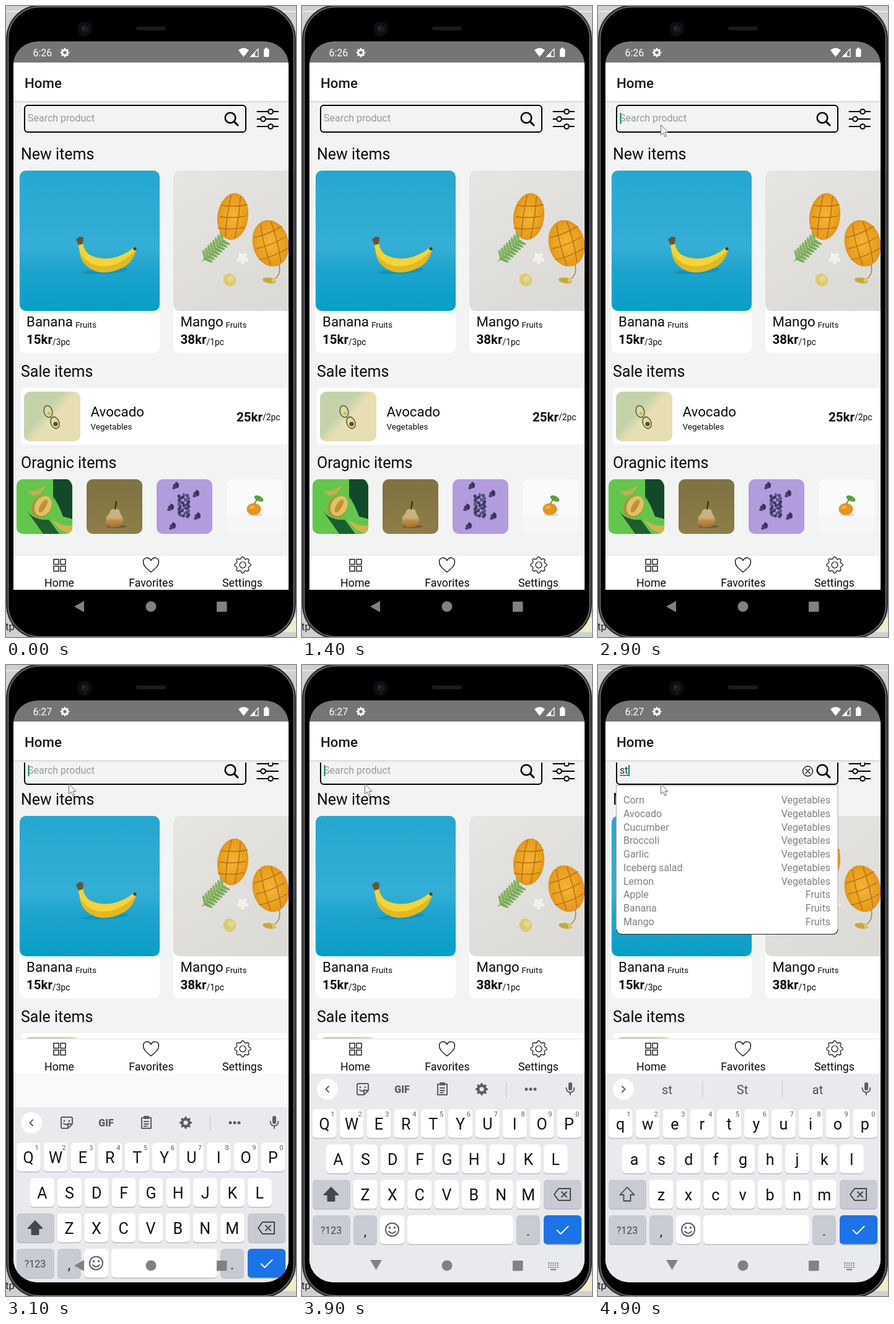
An HTML page that plays this animation: 468 by 1016 pixels, repeating every 5 s.

```html
<!DOCTYPE html>
<html lang="en">
<head>
<meta charset="utf-8">
<title>Grocery search</title>
<style>
html, body { margin: 0; width: 468px; height: 1016px; overflow: hidden; background: #ccc; }
svg { display: block; font-family: Roboto, sans-serif; }
</style>
</head>
<body>
<svg id="stage" width="468" height="1016" viewBox="0 0 468 1016"></svg>
<script>
const LOOP = 5000, STEP = 100;
const stage = document.getElementById('stage');

const repeat = (n, draw) => Array.from({ length: n }, (_, i) => draw(i)).join('');
const rect = (x, y, w, h, fill, r = 0, extra = '') =>
  `<rect x="${x}" y="${y}" width="${w}" height="${h}" rx="${r}" fill="${fill}" ${extra}/>`;
const circle = (x, y, r, fill, extra = '') => `<circle cx="${x}" cy="${y}" r="${r}" fill="${fill}" ${extra}/>`;
const oval = (x, y, rx, ry, turn, fill, extra = '') =>
  `<ellipse rx="${rx}" ry="${ry}" fill="${fill}" transform="translate(${x} ${y}) rotate(${turn})" ${extra}/>`;
const path = (d, fill = 'none', extra = '') => `<path d="${d}" fill="${fill}" ${extra}/>`;
const line = (d, color, width = 1) =>
  path(d, 'none', `stroke="${color}" stroke-width="${width}" stroke-linecap="round" stroke-linejoin="round"`);
const text = (s, x, y, size, fill = '#0b0b0b', extra = '') =>
  `<text x="${x}" y="${y}" font-size="${size}" fill="${fill}" ${extra}>${s}</text>`;
const MID = 'text-anchor="middle"', BOLD = 'font-weight="700"';
const group = (content, y = 0, extra = '') => `<g transform="translate(0 ${y})" ${extra}>${content}</g>`;

function cog(x, y, outer, inner) {
  const points = Array.from({ length: 32 }, (_, i) => {
    const a = (i - 0.5) * Math.PI / 16, r = i % 4 < 2 ? outer : inner;
    return `${(x + r * Math.sin(a)).toFixed(2)} ${(y - r * Math.cos(a)).toFixed(2)}`;
  });
  return `M${points.join('L')}Z`;
}
const solidCog = (x, y, r, fill, hole) => path(cog(x, y, r, r * 0.76), fill) + circle(x, y, r * 0.36, hole);

const defs = `<defs>
  <clipPath id="screen"><rect x="12" y="57" width="444" height="937" rx="40" ry="37"/></clipPath>
  <clipPath id="page"><rect x="12" y="153" width="444" height="787"/></clipPath>
  <clipPath id="melon"><rect x="17" y="762" width="90" height="88" rx="10"/></clipPath>
  <linearGradient id="sky" x2="0" y2="1"><stop stop-color="#25a7cf"/><stop offset=".55" stop-color="#34aed6"/>
    <stop offset=".7" stop-color="#1ea4cd"/><stop offset="1" stop-color="#079fc7"/></linearGradient>
  <linearGradient id="paper" x2=".6" y2="1"><stop stop-color="#e6e5e2"/><stop offset="1" stop-color="#dbdad6"/></linearGradient>
  <linearGradient id="shade" x2="0" y2="1"><stop stop-color="#d5d7d6"/><stop offset="1" stop-color="#f2f4f3"/></linearGradient>
  <linearGradient id="pastel" x2="1" y2=".8"><stop offset=".42" stop-color="#c4d2a9"/><stop offset=".58" stop-color="#e8deb3"/></linearGradient>
  <linearGradient id="olive" x2="0" y2="1"><stop stop-color="#7f7242"/><stop offset="1" stop-color="#8d7d48"/></linearGradient>
  <linearGradient id="pear" x2="0" y2="1"><stop stop-color="#c8b486"/><stop offset=".5" stop-color="#cbb078"/>
    <stop offset=".65" stop-color="#bd8c45"/><stop offset="1" stop-color="#a87332"/></linearGradient>
  <radialGradient id="ripe"><stop stop-color="#f6b535"/><stop offset="1" stop-color="#e69a18"/></radialGradient>
</defs>`;

const phone = rect(0, 0, 468, 1016, '#cfd0d2') + rect(0, 8, 468, 1.5, '#f1f1f1') +
  rect(440, 984, 28, 24, '#f0ecc9') + text('tp', -1, 1005, 17, '#222') +
  rect(0.5, -1.5, 467, 1020, '#29292b', 54, 'stroke="#3b3b3d"') +
  rect(3.5, 1.5, 461, 1014, '#000', 51, 'stroke="#77787a" stroke-width="1.5"') +
  circle(127, 37, 12, '#0e0e10') + circle(127, 37, 6, '#191b22') + circle(125, 36, 2, '#2f3444') +
  rect(210, 33, 48, 6, '#1e1b1a', 3);

const statusBar = clock => rect(12, 57, 444, 34, '#757575') + text(clock, 43.5, 81, 16, '#fff') +
  solidCog(95, 75, 7.5, '#fff', '#757575') +
  path('M375 71Q383.5 64 392 71L383.5 82Z', '#fff') +
  path('M395 81.500L407 69V81.500Z', 'none', 'stroke="#fff" stroke-width="1.300"') +
  path('M394.500 82L402 74.500V82Z', '#fff') +
  rect(416, 69, 8.5, 13, '#fff', 1.5) + rect(418.5, 67, 3.5, 3, '#fff');

const appBar = rect(12, 91, 444, 62.5, '#fff') + rect(12, 153, 444, 4, 'url(#shade)') +
  text('Home', 30, 132, 22.3, '#17171a', 'font-weight="500"');

function searchBox({ typed, caret, underline }) {
  const caretX = typed ? 35.5 + [0, 8, 13.5][typed.length] : 35.5;
  return rect(30, 160, 357, 43, '#f2f4f3', 5, 'stroke="#000" stroke-width="2"') +
    (typed ? text(typed, 35, 186, 16, '#222') : text('Search product', 35, 186, 16, '#999')) +
    (underline ? rect(35, 188, 14, 1.2, '#333') : '') +
    (caret ? rect(caretX, 172, 2, 18, '#0c8574') : '') +
    circle(362, 180, 8.3, 'none', 'stroke="#000" stroke-width="2.6"') + line('M368.500 186.500L374 192', '#000', 3) +
    (typed ? circle(338.5, 182, 8, 'none', 'stroke="#111" stroke-width="1.3"') + line('M335 178.500l7 7m0-7l-7 7', '#111', 1.4) : '') +
    [[170, 427], [182, 415], [194, 427]].map(([y, x]) => line(`M405.500 ${y}H439`, '#000', 2.2) +
      circle(x, y, 3.8, '#f2f4f3', 'stroke="#000" stroke-width="2"')).join('');
}

const product = (x, name, price, unit) => text(name, x, 516, 22.3) +
  text('Fruits', name === 'Banana' ? x + 79 : x + 73, 518, 13.5) +
  text(price, x, 544, 20.5, '#0b0b0b', BOLD) + text(unit, x + 42, 546, 13.8);

const bananaPhoto = rect(22, 265, 226, 226, 'url(#sky)', 10) +
  oval(160, 427, 38, 4, -4, '#0f83ae', 'opacity=".55"') +
  path('M115 376L124 374Q123 391 134 400Q150 409 170 406Q190 402 205 390L210 392Q206 410 190 420Q167 433 145 427Q121 418 119 396Z', '#f5d433') +
  path('M119 396Q128 413 147 418Q178 424 209 394Q205 412 190 420Q167 433 145 427Q121 418 119 396Z', '#e3b91f') +
  path('M113 376L119 371L125 373L124 383L117 385Z', '#6b5330') + circle(208, 391, 2.5, '#4b3a1d');

const mango = (x, y, rx, ry, turn) => `<g transform="translate(${x} ${y}) rotate(${turn})">` +
  oval(0, 0, rx, ry, 0, 'url(#ripe)', 'stroke="#dc9120" stroke-width="1.5"') +
  line(`M${-rx * 0.3} ${-ry * 0.9}Q${-rx * 0.45} 0 ${-rx * 0.3} ${ry * 0.9}M${rx * 0.32} ${-ry * 0.9}Q${rx * 0.45} 0 ${rx * 0.32} ${ry * 0.9}`, '#b9741a', 1.6) +
  [-0.5, 0, 0.5].map(k => line(`M${-rx * 0.85} ${ry * (k + 0.08)}Q0 ${ry * (k + 0.1)} ${rx * 0.85} ${ry * (k - 0.1)}`, '#b9741a', 1.6)).join('') + '</g>';

const mangoPhoto = rect(270, 265, 226, 226, 'url(#paper)', 10) +
  mango(366, 339, 24, 37, 8) + mango(427, 382, 28, 37, -14) +
  line('M317 410Q333 401 353 377', '#7aa956', 1.6) +
  repeat(8, i => {
    const x = 321 + i * 4, y = 406 - i * 4;
    return oval(x - 1, y - 6, 2.3, 8, -14, '#83b261') + oval(x + 5, y + 3, 2.3, 8, -66, '#78aa57');
  }) +
  repeat(5, i => oval(382 + 5 * Math.sin(i * 1.26), 406 + 5 * Math.cos(i * 1.26), 3, 5, -i * 72, '#f3f2f0')) +
  oval(361, 441, 10, 11, -30, '#d9cc76') + circle(363, 439, 5, '#e4da85') +
  line('M441 417Q444 434 432 440', '#a58b3e', 1.6) + oval(425, 442, 11, 4.5, 8, '#c6a83d') + circle(432, 442, 3, '#e1cb64');

const avocado = (x, y, turn) => oval(x, y, 7.5, 10.5, turn, '#5f6b3d') + oval(x, y, 5.8, 8.7, turn, '#e0daa6');

const saleItem = rect(24, 615, 440, 91, '#fff', 6) + rect(29, 621, 91, 80, 'url(#pastel)', 10) +
  avocado(68, 653, -15) + avocado(79, 671, -22) + circle(80, 673, 3.5, '#70401f') + circle(69, 656, 2.5, '#c2b56c') +
  text('Avocado', 136.5, 661, 22.3) + text('Vegetables', 136.5, 682, 13.5) +
  text('25kr', 372, 669, 20.5, '#0b0b0b', BOLD) + text('/2pc', 414, 667, 13.8);

const sprig = ([x, y]) => oval(x, y, 5, 3, 25, '#3f3a66') + oval(x + 2, y - 3, 2.5, 4, -30, '#35335a') + oval(x - 3, y + 3, 3, 2, 0, '#4a4071');

const organicItems = group(rect(17, 762, 90, 88, '#63c64c') +
    path('M76 762H101L107 772V826L92 822Q84 800 76 790Z', '#12492b') +
    path('M33 812Q45 829 69 827L86 850H60Z', '#1c5f2c') +
    oval(58, 806, 16, 19.5, 30, '#a8963a') + oval(60, 805, 13, 17, 30, '#dfc366') + oval(60, 805, 4.5, 12, 30, '#c58f35') +
    path('M34 780Q49 784 63 772Q59 788 43 788Z', '#c9ae4a') + path('M74 826Q91 840 107 836V850Q84 847 74 826Z', '#d2b24e'),
    0, 'clip-path="url(#melon)"') +
  rect(130, 762, 90, 88, 'url(#olive)', 10) + oval(178, 838, 17, 2.5, 0, '#5a4f28', 'opacity=".6"') +
  path('M169 812Q176 806 183 812Q184 818 188 823Q192 839 175 839Q158 839 162 823Q167 818 169 812Z', 'url(#pear)') +
  line('M176 810L178 798', '#30251a', 2) +
  rect(243, 762, 90, 88, '#b29cdd', 10) +
  repeat(36, i => circle(287 + 8 * Math.sin(i * 2.4), 787 + i, 2.5, i % 3 ? '#3b3a63' : '#5a5a8c')) +
  [[274, 773], [307, 786], [266, 808], [309, 822], [269, 838]].map(sprig).join('') +
  rect(356, 762, 90, 88, '#fafafb', 10) + rect(356, 819, 90, 31, '#f6f6f8', 10) + oval(402, 819, 12, 2, 0, '#d6cec9') +
  oval(400, 810, 11.5, 9.5, 0, '#e5931f') + oval(397, 807, 5, 3, 0, '#f2ab3e') +
  oval(408, 793, 8, 4, 25, '#58a338') + line('M401 801L405 795', '#53722d', 1.4);

const catalogue = text('New items', 24, 247, 25) +
  rect(22, 265, 226, 294, '#fff', 10) + bananaPhoto + product(33, 'Banana', '15kr', '/3pc') +
  rect(270, 265, 226, 294, '#fff', 10) + mangoPhoto + product(281.5, 'Mango', '38kr', '/1pc') +
  text('Sale items', 24, 597, 25) + saleItem + text('Oragnic items', 24, 743.5, 25) + organicItems;

const PRODUCTS = ['Corn', 'Avocado', 'Cucumber', 'Broccoli', 'Garlic', 'Iceberg salad', 'Lemon', 'Apple', 'Banana', 'Mango'];
const dropdown = path('M29.500 194H387V425Q387 433.500 378.500 433.500H38Q29.500 433.500 29.500 425Z', '#fff', 'stroke="#a9abaa"') +
  line('M30 426Q31 433.500 38.500 433.500H378Q386 433.500 387 426', '#222', 1.2) +
  PRODUCTS.map((name, i) => text(name, 41, 223 + i * 21.78, 16, '#818181') +
    text(i < 7 ? 'Vegetables' : 'Fruits', 375, 223 + i * 21.78, 16, '#818181', 'text-anchor="end"')).join('');

const tabs = rect(12, 884, 444, 56, '#fff') + rect(12, 883.5, 444, 1, '#dfe1e0') +
  repeat(4, i => rect(77 + i % 2 * 11, 891 + (i >> 1) * 11, 8, 8, 'none', 0, 'stroke="#111" stroke-width="1.4"')) +
  line('M234 911.500C226 905 221.500 901 221.500 895.500C221.500 887 231 886.500 234 893C237 886.500 246.500 887 246.500 895.500C246.500 901 242 905 234 911.500Z', '#111', 1.4) +
  line(cog(382, 900, 13, 10.3), '#111', 1.2) + circle(382, 900, 5, 'none', 'stroke="#111" stroke-width="1.2"') +
  text('Home', 86, 935, 17.8, '#0b0b0b', MID) + text('Favorites', 234.5, 935, 17.8, '#0b0b0b', MID) +
  text('Settings', 381.5, 935, 17.8, '#0b0b0b', MID);

const INK = '#5b5e63';
const toolIcons = line('M43 678.500l-4.500 4.500 4.500 4.500', INK, 2) +
  line('M91 674H105Q107 674 107 676V685L100 692H91Q89 692 89 690V676Q89 674 91 674ZM107 685H100V692M93 684Q97 688 101 684', INK, 2) +
  circle(94, 680, 1.4, INK) + circle(102, 680, 1.4, INK) +
  text('GIF', 161.5, 689, 16, INK, MID + ' font-weight="900"') +
  line('M219 675H234V692H219ZM223 681H230M223 685H230M223 688.500H228', INK, 2) + rect(222, 672, 9, 5, INK, 1) +
  solidCog(290, 683, 10, INK, '#e8eaed') + rect(329, 671, 1, 25, '#c2c4c9') +
  [362, 369, 376].map(x => circle(x, 683, 2.5, INK)).join('');

const suggestions = words => line('M39 678.500l4.500 4.500-4.500 4.500', INK, 2) +
  words.map((w, i) => text(w, 111.5 + i * 121.5, 691, 20, '#4c4e52', MID)).join('') +
  rect(168.5, 670, 1, 26, '#c2c4c9') + rect(297, 670, 1, 26, '#c2c4c9');

const keyCap = (x, y, w, fill = '#fff') => rect(x, y + 1, w, 47, '#b9bbc0', 6) + rect(x, y, w, 46.5, fill, 6);
const KEY_GREY = '#c8cbd1', PITCH = 43.85;
const ROWS = [['QWERTYUIOP', 36.2, 715], ['ASDFGHJKL', 58.5, 772], ['ZXCVBNM', 102, 829]];

function keyboard(typed, words) {
  const letters = ROWS.map(([keys, left, top], row) => [...keys].map((key, i) => {
    const x = left + i * PITCH;
    return keyCap(x - 19.5, top, 39) + text(typed ? key.toLowerCase() : key, x, top + 32.5, 25, '#111', MID) +
      (row ? '' : text((i + 1) % 10, x + 13.5, 727, 11, INK, MID));
  }).join('')).join('');
  return rect(12, 658, 444, 400, '#e8eaed') + circle(41, 683, 17, '#fff') +
    (typed ? suggestions(words) : toolIcons) +
    rect(430, 672, 6, 13, INK, 3) + line('M426.500 681Q427 688 433 688Q439 688 439.500 681M433 688V692', INK, 2) +
    letters +
    keyCap(17, 829, 61, KEY_GREY) +
    path('M47 841L58.500 853H52.500V863H41.500V853H35.500Z', typed ? 'none' : '#45484c', 'stroke="#45484c" stroke-width="1.800" stroke-linejoin="round"') +
    keyCap(390, 829, 61, KEY_GREY) + line('M414 843H433V862H414L407 852.500ZM419 848.500l8 8m0-8l-8 8', '#45484c', 2) +
    keyCap(17, 886, 61, KEY_GREY) + text('?123', 47, 916, 16, '#45484c', MID) +
    keyCap(83, 886, 38, KEY_GREY) + text(',', 102, 919, 22, '#222', MID) +
    keyCap(126, 886, 39) + circle(145.5, 909, 10.5, 'none', `stroke="${INK}" stroke-width="2"`) +
    circle(141.5, 906, 1.7, INK) + circle(149.5, 906, 1.7, INK) + line('M140 912Q145.500 918 151 912', INK, 2) +
    keyCap(170, 886, 171) + keyCap(346, 886, 38, KEY_GREY) + text('.', 365, 919, 22, '#222', MID) +
    keyCap(390, 886, 61, '#1a73e8') + line('M411.500 910l6 6 12-12', '#fff', 2);
}

const navButtons = settled =>
  path(settled ? 'M110 958H129L119.500 974Z' : 'M126 958V976L110 967Z', '#808184') +
  circle(234, 967, 8.5, '#808184') + rect(340, 959, 16.5, 16.5, '#808184', 1) +
  (settled ? repeat(15, i => rect(397 + i % 5 * 3.7, 962 + Math.floor(i / 5) * 3.5, 2, 2, '#808184')) + rect(401, 972.5, 9, 2, '#808184') : '');

function pointer(t) {
  if (t < 2000) return '';
  const left = 1 - Math.min(1, (t - 2000) / 400), ease = left * left;
  const x = 101.5 - 54 * ease, y = 191.5 + 55 * ease;
  return `<path transform="translate(${x} ${y})" d="M0 0V16L3.700 12.600 6.500 19 9 18 6.300 11.800H11.500Z" fill="#fff" fill-opacity="${t < 2400 ? 0.6 : 1}" stroke="#666" stroke-width="1"/>`;
}

function scene(t) {
  const open = t >= 3100;
  const typed = t >= 4800 ? 'st' : t >= 4500 ? 's' : '';
  const words = t >= 4900 ? ['st', 'St', 'at'] : ['s', 'S', 'as'];
  const caret = t >= 2800 && (t >= 4500 || Math.floor((t - 2800) / 500) % 2 === 0);
  const slide = 54 * Math.max(0, 1 - (t - 3100) / 200) ** 2;
  const page = rect(12, 153, 444, 787, '#f2f4f3') + group(catalogue, open ? -22 : 0) +
    group(searchBox({ typed, caret, underline: t >= 4900 }), open ? -11 : 0) + (typed ? dropdown : '');
  const bottom = open
    ? rect(12, 657, 444, 337, '#f8f9f9') + group(tabs, -282) + group(keyboard(typed, words), slide)
    : tabs + rect(12, 940, 444, 54, '#000');
  return defs + phone + group(
    group(page, 0, 'clip-path="url(#page)"') + appBar + statusBar(t >= 3000 ? '6:27' : '6:26') +
    bottom + navButtons(t >= 3200), 0, 'clip-path="url(#screen)"') + pointer(t);
}

let shown = -1;
function tick(now) {
  const t = Math.floor(now % LOOP / STEP) * STEP;
  if (t !== shown) stage.innerHTML = scene(shown = t);
  requestAnimationFrame(tick);
}
tick(performance.now());
</script>
</body>
</html>
```
